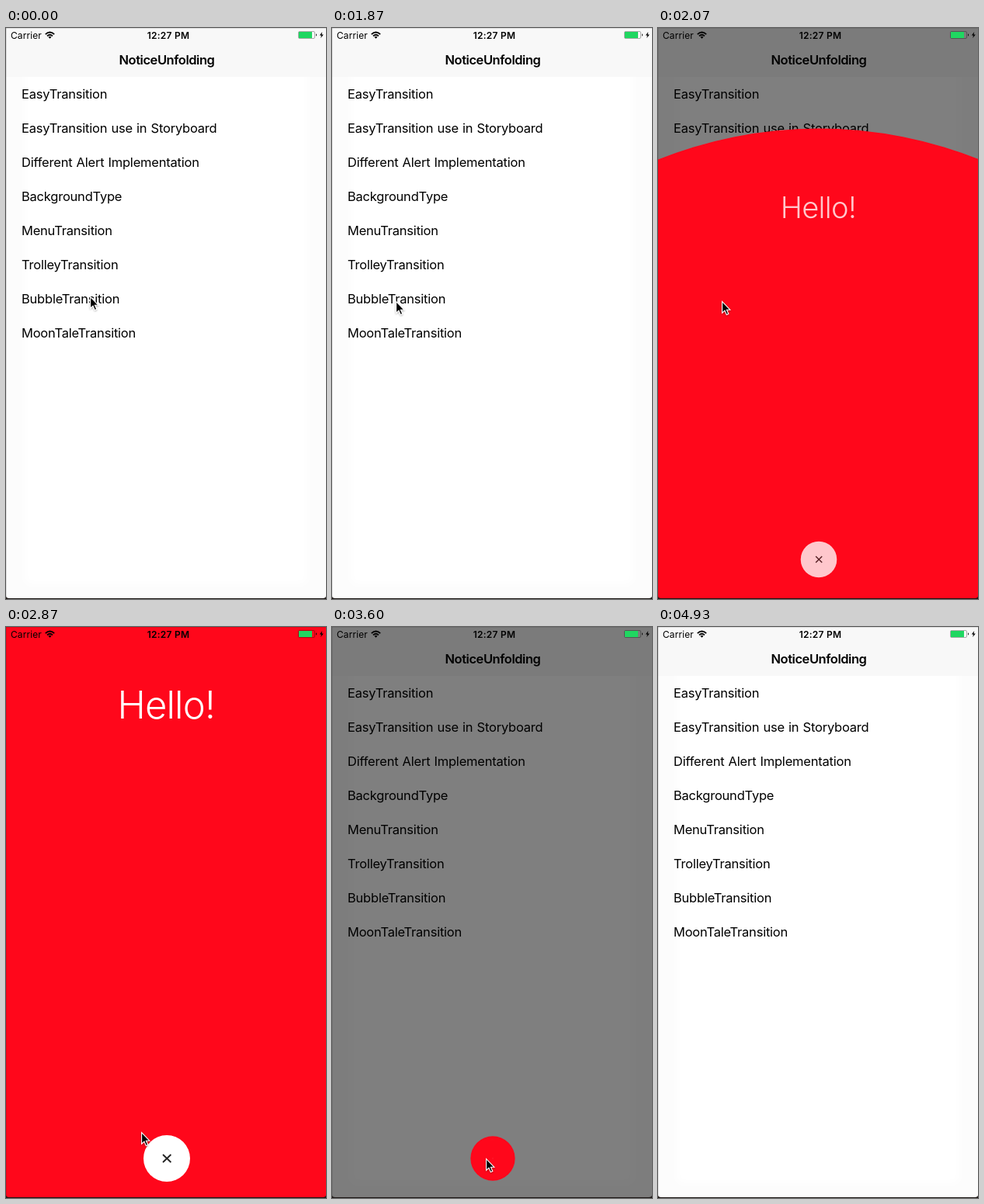
Recreate the animation shown at these times as an HTML page. Size 412 by 736 pixels, loop 5.07 s.

```html
<!DOCTYPE html>
<html lang="en">
<head>
<meta charset="utf-8">
<title>Bubble alert</title>
<style>
  html, body { margin: 0; width: 100%; height: 100%; overflow: hidden; background: #fff; }
  svg { display: block; width: 412px; height: 736px; }
  text { font-family: Inter, Roboto, "Liberation Sans", sans-serif; font-size: 16.5px; letter-spacing: -.22px; word-spacing: .8px; fill: #000; }
  .title { font-weight: 600; letter-spacing: -.45px; text-anchor: middle; }
  .status text { font-size: 12px; letter-spacing: .1px; word-spacing: 0; }
  .status .clock { font-weight: 600; letter-spacing: .25px; text-anchor: middle; }
  .hello { font-size: 49px; font-weight: 300; letter-spacing: -.8px; text-anchor: middle; fill: #fff; }
</style>
</head>
<body>
<svg viewBox="0 0 412 736">
  <defs>
    <filter id="soft" x="-50%" y="-50%" width="200%" height="200%">
      <feDropShadow dx="0" dy="1" stdDeviation="1" flood-opacity=".35"/>
    </filter>
    <filter id="blur"><feGaussianBlur stdDeviation="4"/></filter>
  </defs>

  <rect width="412" height="736" fill="#fcfcfc"/>
  <rect x="24" y="24" width="364" height="693" rx="10" fill="#fff" filter="url(#blur)"/>
  <rect width="412" height="63" fill="#f8f8f8"/>
  <text class="title" x="207" y="47">NoticeUnfolding</text>
  <g id="rows"></g>

  <rect id="dim" width="412" height="736" fill="#000" opacity=".5"/>
  <g id="bubble">
    <circle r="715.6" fill="#ff071b"/>
    <g id="content">
      <text class="hello" x="-.8" y="-567">Hello!</text>
      <circle r="30" fill="#fff"/>
      <path d="M-5 -5L5.4 5M5.4 -5L-5 5" stroke="#222" stroke-width="1.8"/>
    </g>
  </g>

  <g class="status">
    <text x="6" y="14">Carrier</text>
    <g fill="none" stroke="#000" stroke-width="1.8">
      <path d="M50.8 8.2Q56.5 2.9 62.2 8.2M53 10.4Q56.5 7.2 60 10.4"/>
      <path d="M54.5 11.6Q56.5 10 58.5 11.6L56.5 13.8Z" fill="#000" stroke="none"/>
    </g>
    <text class="clock" x="209" y="14">12:27 PM</text>
    <rect x="376.5" y="4.5" width="21" height="9" rx="1.5" fill="none" stroke="#000" stroke-opacity=".4" stroke-width=".8"/>
    <rect x="377" y="5" width="17" height="8" fill="#20d761"/>
    <path d="M399 7.3Q401 9 399 10.7Z"/>
    <path d="M407.2 5L403.8 9.4H406L405.2 13L408.8 8.4H406.5Z"/>
  </g>
  <path d="M.5 0V736M0 .5H412" stroke="#000" stroke-opacity=".11" fill="none"/>
  <path d="M0 732Q0 735 4 735H408Q412 735 412 732V736H0Z" fill="#1c1614"/>

  <g id="cursor" filter="url(#soft)">
    <path d="M.6 .6V15.2L4 12.1L6.3 17.6L8.8 16.5L6.4 11.2H10.8Z" stroke="#fff" stroke-width="1.1"/>
  </g>
</svg>
<script>
const LOOP = 5070;
const ORIGIN = [207, 685];
const GROW = 290, OPEN = 1875, CLOSE = 3351, CURSOR_GONE = 4530;
const ROWS = ["EasyTransition", "EasyTransition use in Storyboard", "Different Alert Implementation",
  "BackgroundType", "MenuTransition", "TrolleyTransition", "BubbleTransition", "MoonTaleTransition"];
// time, x, y of the pointer tip
const PATH = [
  [0, 108, 346], [270, 108, 346], [1270, 82, 352], [2270, 82, 352],
  [2870, 174, 651], [3200, 198, 685], [3700, 198, 685],
  [4270, 135, 238], [4470, 109, 76], [LOOP, 109, 76]
];

const $ = id => document.getElementById(id);
const clamp = v => Math.min(1, Math.max(0, v));
const bez = (u, a, b) => 3 * u * (1 - u) ** 2 * a + 3 * u * u * (1 - u) * b + u ** 3;

// cubic-bezier(.42, 0, .58, 1), solved by bisection
function ease(x) {
  if (x <= 0 || x >= 1) return clamp(x);
  let lo = 0, hi = 1;
  for (let i = 0; i < 20; i++) {
    const mid = (lo + hi) / 2;
    if (bez(mid, .42, .58) < x) lo = mid; else hi = mid;
  }
  return bez(lo, 0, 1);
}

function pointer(t) {
  const i = PATH.findIndex(p => p[0] > t);
  const a = PATH[i - 1], b = PATH[i];
  const k = ease((t - a[0]) / (b[0] - a[0]));
  return [a[1] + (b[1] - a[1]) * k, a[2] + (b[2] - a[2]) * k];
}

ROWS.forEach((label, i) => {
  const row = document.createElementNS("http://www.w3.org/2000/svg", "text");
  row.setAttribute("x", 20);
  row.setAttribute("y", 91 + 44 * i);
  row.textContent = label;
  $("rows").append(row);
});

function draw(t) {
  const s = ease((t - OPEN) / GROW) - ease((t - CLOSE) / GROW);
  const shown = s > 0 ? "inline" : "none";
  $("dim").style.display = shown;
  $("bubble").style.display = shown;
  $("bubble").setAttribute("transform", `translate(${ORIGIN}) scale(${s})`);
  $("content").setAttribute("opacity", s);
  $("cursor").setAttribute("transform", `translate(${pointer(t).map(Math.round)})`);
  $("cursor").style.display = t < CURSOR_GONE ? "inline" : "none";
}

// The picture advances 15 times a second, on times rounded to 10 ms.
const tick = t => Math.round(Math.floor(t * .015 + .055) * 100 / 15) * 10;
const start = performance.now();
function frame() {
  const t = (performance.now() - start) % LOOP;
  draw(Math.min(tick(t), LOOP - 1));
  requestAnimationFrame(frame);
}
frame();
</script>
</body>
</html>
```
